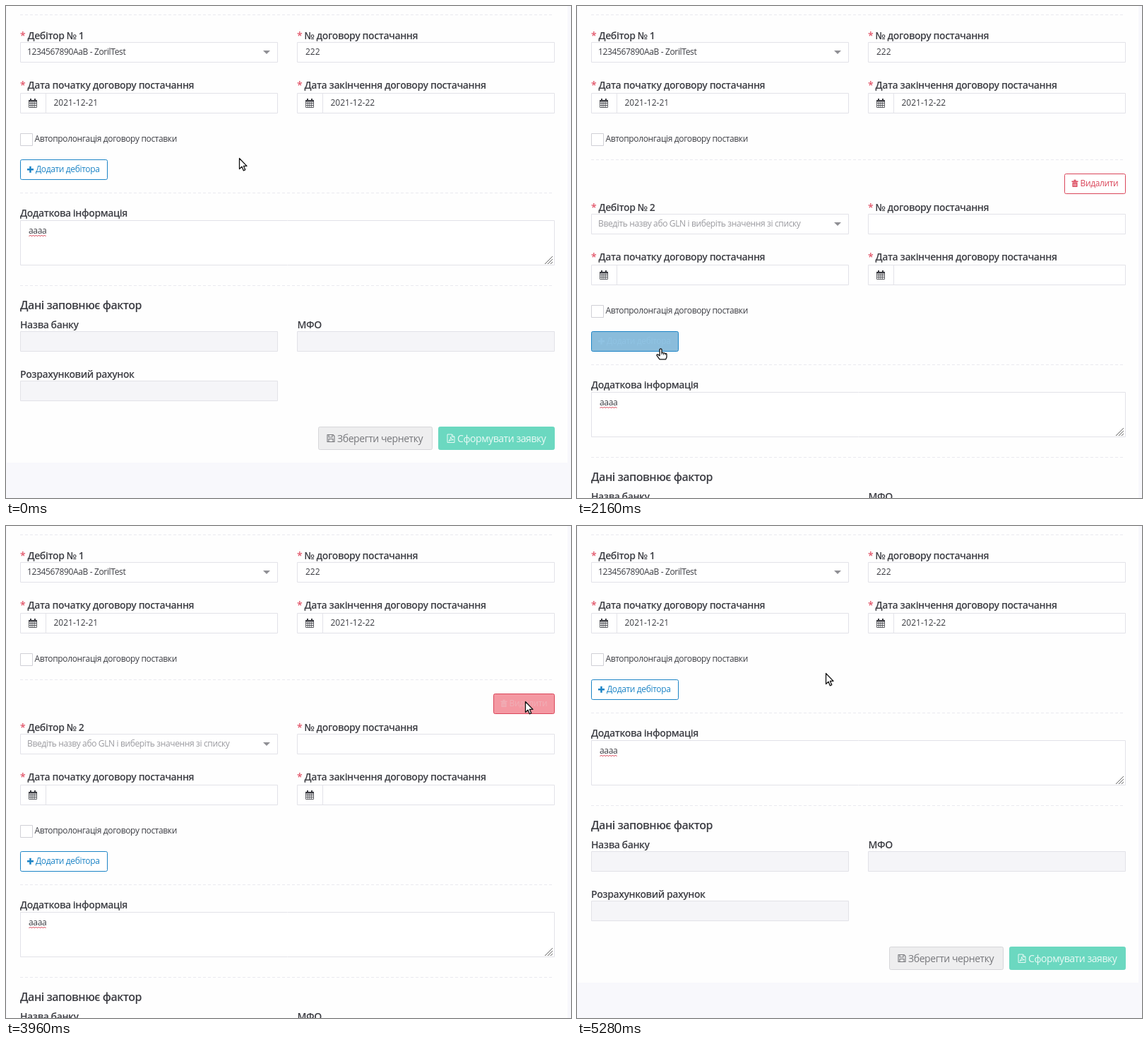
Recreate the animation shown at these times as an HTML page with a canvas. Size 800 px wide and 696 px high, loop 5.3 s.

```html
<!DOCTYPE html>
<html lang="uk">
<head>
<meta charset="utf-8">
<style>
html, body { margin: 0; width: 100%; height: 100%; overflow: hidden; background: #f8f8fc; }
canvas { display: block; }
</style>
</head>
<body>
<canvas id="stage" width="800" height="696"></canvas>
<script>
const ctx = document.getElementById('stage').getContext('2d');
const LOOP = 5300, STEP = 243;
const INK = '#3c3d43', LINE = '#e2e2e8', BLUE = [28, 132, 198], RED = [218, 70, 90], WHITE = [255, 255, 255];

// Pointer stops: time, x, y
const PATH = [
  [0, 330, 215], [450, 330, 215], [960, 118, 236], [1650, 118, 236], [2170, 118, 485],
  [2560, 118, 485], [2900, 674, 513], [3350, 740, 497], [3540, 740, 497], [3955, 735, 248],
  [4420, 735, 248], [5050, 352, 208], [LOOP, 352, 208]
];
const ADD = [1300, 2440], REMOVE = [3500, 4360];

const clamp = v => Math.max(0, Math.min(1, v));
const smooth = v => { v = clamp(v); return v * v * (3 - 2 * v); };
const mix = (a, b, k) => a.map((v, i) => v + (b[i] - v) * k);
const rgb = c => `rgb(${c.map(Math.round)})`;
const fade = (t, on, off) => smooth((t - on) / 150) * (1 - smooth((t - off) / 150));
const between = (t, a, b) => t >= a && t < b;

function pointer(t) {
  const i = PATH.findIndex(p => p[0] > t), [a, b] = [PATH[i - 1], PATH[i]];
  const k = smooth((t - a[0]) / (b[0] - a[0]));
  return [a[1] + (b[1] - a[1]) * k, a[2] + (b[2] - a[2]) * k];
}

// Cyrillic is set slightly tight, plain numbers are not
function text(s, x, y, size = 12, color = INK, weight = 400) {
  ctx.font = `${weight} ${size}px "Open Sans", sans-serif`;
  ctx.letterSpacing = /[а-яі]/i.test(s) ? `${-.03 * size}px` : '0px';
  ctx.fillStyle = color;
  ctx.fillText(s, x, y);
}

// Border lines run through the pixels x, y and x + w, y + h
function box(x, y, w, h, fill = '#fff', stroke = LINE, r = 0) {
  ctx.beginPath();
  ctx.roundRect(x + .5, y + .5, w, h, r);
  ctx.fillStyle = fill;
  ctx.fill();
  ctx.strokeStyle = stroke;
  ctx.lineWidth = 1;
  ctx.stroke();
}

function rects(color, ...list) {
  ctx.fillStyle = color;
  for (const r of list) ctx.fillRect(...r);
}

function shape(d, x, y, fill, stroke, width = 1) {
  const path = new Path2D(d);
  ctx.save();
  ctx.translate(x, y);
  ctx.lineJoin = 'round';
  ctx.lineWidth = width;
  if (fill) { ctx.fillStyle = fill; ctx.fill(path); }
  if (stroke) { ctx.strokeStyle = stroke; ctx.stroke(path); }
  ctx.restore();
}

function divider(y) {
  ctx.setLineDash([4, 3]);
  shape('M20 .5H776', 0, y, null, '#e9e9ef');
  ctx.setLineDash([]);
}

function label(s, x, y, required) {
  if (required) text('*', x, y, 14, '#e25468', 600);
  text(s, x + (required ? 10.5 : 0), y, 14, INK, 600);
}

function dateField(x, y, value) {
  box(x, y, 364, 28);
  rects(LINE, [x + 36, y, 1, 28]);
  shape('M.5 3H11.5V12.5H.5ZM.5 6.5H11.5M.5 9.5H11.5M3.3 5V12.5M6 5V12.5M8.7 5V12.5', x + 12, y + 8, null, INK, .8);
  rects(INK, [x + 12, y + 10, 12, 2.5], [x + 14, y + 8, 2, 3], [x + 20, y + 8, 2, 3]);
  text(value, x + 47.5, y + 18);
}

function debtor(n, y) {
  const first = n === 1;
  label('Дебітор № ' + n, 20, y + 47, true);
  label('№ договору постачання', 412, y + 47, true);
  box(20, y + 51, 364, 28);
  text(first ? '1234567890АаВ - ZorilTest' : 'Введіть назву або GLN і виберіть значення зі списку',
    30, y + 69, 12, first ? INK : '#9a9a9f');
  shape('M0 0H10L5 5Z', 364, y + 63, '#8f8f94');
  box(412, y + 51, 364, 28);
  if (first) text('222', 424, y + 69);
  label('Дата початку договору постачання', 20, y + 117, true);
  label('Дата закінчення договору постачання', 412, y + 117, true);
  dateField(20, y + 123, first ? '2021-12-21' : '');
  dateField(412, y + 123, first ? '2021-12-22' : '');
  box(20, y + 180, 17, 17, '#fff', '#d0d0d6');
  text('Автопролонгація договору поставки', 40.5, y + 192);
}

function removeButton(y, hover, pressed) {
  const fill = rgb(pressed ? [187, 56, 72] : mix(WHITE, [236, 71, 88], hover));
  const ink = rgb(mix(RED, WHITE, pressed ? 1 : hover));
  if (pressed) ctx.setLineDash([1, 1]);
  box(690, y, 86, 28, fill, rgb(RED), 2);
  ctx.setLineDash([]);
  shape('M3 .5H6M0 2.2H9', 700.5, y + 9, null, ink, 1.4);
  shape('M1 3.5H8V10H1Z', 700.5, y + 9, ink);
  shape('M3 5V9M4.5 5V9M6 5V9', 700.5, y + 9, null, fill, .6);
  text('Видалити', 712.5, y + 18, 12, ink);
}

function addButton(y, hover) {
  const ink = rgb(mix(BLUE, WHITE, hover));
  box(20, y, 123, 28, rgb(mix(WHITE, [26, 123, 185], hover)), rgb(BLUE), 2);
  rects(ink, [30, y + 13, 9, 2.5], [33.2, y + 9.8, 2.5, 9]);
  text('Додати дебітора', 42, y + 18, 12, ink);
}

function footer(y) {
  divider(y + 264);
  label('Додаткова інформація', 20, y + 298);
  box(20, y + 303, 756, 63);
  text('аааа', 32, y + 322);
  shape('M0 1.5' + 'l2 -2l2 2'.repeat(6), 32.5, y + 324.5, null, '#d8394c', 1);
  shape('M0 11L11 0M4 11L11 4M8 11L11 8', 763, y + 354, null, '#666', 1);
  divider(y + 395);
  text('Дані заповнює фактор', 20, y + 429, 16, INK, 600);
  label('Назва банку', 20, y + 456);
  label('МФО', 412.5, y + 456);
  label('Розрахунковий рахунок', 20, y + 526);
  for (const [x, dy] of [[20, 460], [412, 460], [20, 530]]) box(x, y + dy, 364, 28, '#f5f5f8');

  box(442, y + 595, 161, 32, '#eeeeef', '#d6d6d9', 2);
  shape('M.5 .5H8.5L10.5 2.5V10.5H.5ZM2.5 .5V4H7.5V.5M2.5 10.5V6.5H8.5V10.5', 454.5, y + 606, null, '#77787c', 1.1);
  text('Зберегти чернетку', 469, y + 617, 14, '#77787c');
  box(612, y + 595, 164, 32, '#6bd8c0', '#6bd8c0', 2);
  shape('M.5 .5H7L10.5 4V12H.5ZM7 .5V4H10.5M2.5 10Q5.5 7 5 4Q6 8 9 8.2Q5 8 2.5 10', 624.5, y + 605.5, null, '#eafaf6', 1);
  text('Сформувати заявку', 639, y + 617, 14, '#eafaf6');
}

function drawPointer(x, y, hand) {
  if (hand) {
    shape('M0 1Q1.5-1 3 1V6Q4.5 5 5.5 6.3Q7 5.5 8 7Q9.7 6.3 10 8V12L8.7 15H0L-4 9.5Q-4.5 7.5-2 8.5L0 10Z',
      x - 1, y, '#fff', '#111', 1.3);
    shape('M3 6V8.5M5.5 6.5V9M8 7V9', x - 1, y, null, '#111', .8);
  } else {
    shape('M.5 .5V15.5L4 12.3L6.3 17.8L8.8 16.7L6.5 11.4H11Z', x, y, '#fff', '#111', 1.3);
  }
}

function draw(t) {
  const count = 1 + ADD.filter(a => t >= a).length - REMOVE.filter(r => t >= r).length;
  const base = count === 3 ? 485 : (count - 1) * STEP;
  rects('#f8f8fc', [0, 0, 800, 696]);
  rects('#fefefe', [1, 0, 794, base + 646]);
  divider(12);
  debtor(1, 0);
  if (count > 1) {
    divider(217);
    removeButton(237, fade(t, 3880, LOOP), between(t, 4270, REMOVE[1]));
    debtor(2, STEP);
  }
  if (count > 2) {
    divider(460);
    removeButton(480, fade(t, 3020, LOOP), between(t, 3400, REMOVE[0]));
    debtor(3, 485);
  }
  addButton(base + 217, fade(t, 895, ADD[0]) + fade(t, 2085, ADD[1]));
  footer(base);
  const hand = between(t, 895, ADD[0]) || between(t, 2085, ADD[1]);
  drawPointer(...pointer(t), hand);
}

function frame() {
  draw(performance.now() % LOOP);
  requestAnimationFrame(frame);
}
frame();
</script>
</body>
</html>
```
